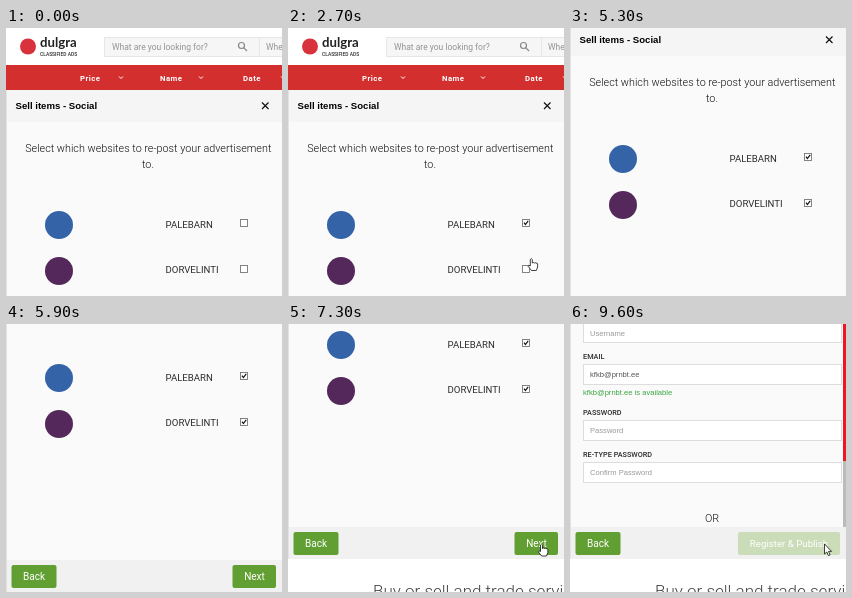
These frames come from a looping animation (276x268 px, 9.9 s). An HTML page:

```html
<!DOCTYPE html>
<html lang="en">
<head>
<meta charset="utf-8">
<title>Re-post an advertisement</title>
<style>
html, body { margin: 0; width: 100%; height: 100%; overflow: hidden; background: #fff; }
svg { display: block; width: 100vw; height: 100vh; }
text { font-family: Roboto, sans-serif; fill: #2b2b2b; white-space: pre; }
.brand { font: bold 13.2px Lato, sans-serif; fill: #222; }
.tag { font-size: 4.9px; font-weight: 500; }
.hint { font-size: 8.5px; fill: #949494; }
.nav { font-size: 7.8px; font-weight: 700; letter-spacing: .45px; fill: #fff; }
.title { font: bold 9.6px "Liberation Sans", Arial, sans-serif; fill: #000; }
.lead { font-size: 10.8px; font-weight: 300; fill: #111; text-anchor: middle; }
.site { font-size: 9.6px; }
.btn { font-size: 10px; fill: #fff; text-anchor: middle; }
.promo { font-size: 17px; font-weight: 300; fill: #444; }
.label { font-size: 7.3px; font-weight: 500; }
.field { font: 7.6px "Liberation Sans", Arial, sans-serif; fill: #999; }
.typed { fill: #555; }
.ok { fill: #3aa640; }
.search { fill: #f6f6f6; stroke: #e6e6e6; }
.box { fill: #fff; stroke: #ddd; }
.line { fill: none; stroke: #111; stroke-width: 1.2; }
.cursor { fill: #fff; stroke: #111; stroke-width: .8; stroke-linejoin: round; }
</style>
</head>
<body>
<svg viewBox="0 0 276 268">
  <defs>
    <rect id="checkbox" x=".5" y=".5" width="7" height="7" fill="#fff" stroke="#777" stroke-width=".9"/>
    <path id="tick" class="line" d="M2 3.7 3.4 5.5 6.2 1.8"/>
    <path id="chevron" d="M-2-1 0 1 2-1" fill="none" stroke="#fff"/>
    <g id="back">
      <rect x="5.5" width="45" height="23" rx="2" fill="#629f33"/>
      <text class="btn" x="28" y="14.5">Back</text>
    </g>
  </defs>

  <g id="page">
    <rect width="276" height="38" fill="#fff"/>
    <circle cx="22" cy="18.5" r="8" fill="#d8323c"/>
    <text class="brand" x="34" y="19">dulgra</text>
    <text class="tag" x="34" y="27.5">CLASSIFIED ADS</text>
    <rect class="search" x="98.5" y="9.5" width="155" height="19"/>
    <rect class="search" x="253.5" y="9.5" width="40" height="19"/>
    <text class="hint" x="106" y="22">What are you looking for?</text>
    <text class="hint" x="260" y="22">Where</text>
    <g fill="none" stroke="#888" stroke-width="1.2"><circle cx="235.5" cy="17.5" r="3"/><path d="M237.7 19.7 241 23"/></g>

    <rect y="37" width="276" height="25" fill="#d32f2f"/>
    <text class="nav" x="74" y="53">Price</text>
    <text class="nav" x="154" y="53">Name</text>
    <text class="nav" x="237" y="53">Date</text>
    <use href="#chevron" x="115" y="49.5"/>
    <use href="#chevron" x="195" y="49.5"/>
    <use href="#chevron" x="277" y="49.5"/>

    <rect y="62" width="276" height="32" fill="#f6f5f6"/>
    <text class="title" x="9.5" y="81.2">Sell items - Social</text>
    <path class="line" d="M256 74.5l6.5 6.5m0-6.5l-6.5 6.5"/>

    <rect y="94" width="276" height="285" fill="#fafafa"/>
    <text class="lead" x="142.3" y="124">Select which websites to re-post your advertisement</text>
    <text class="lead" x="142" y="140">to.</text>
    <circle cx="53" cy="197" r="14" fill="#3463a8"/>
    <circle cx="53" cy="243" r="14" fill="#55285c"/>
    <text class="site" x="159.5" y="200">PALEBARN</text>
    <text class="site" x="159.5" y="245.3">DORVELINTI</text>
    <use href="#checkbox" x="234" y="191"/>
    <use href="#checkbox" x="234" y="237"/>
    <use id="tick1" href="#tick" x="234" y="191"/>
    <use id="tick2" href="#tick" x="234" y="237"/>

    <rect y="379" width="276" height="32" fill="#f1f1f1"/>
    <use href="#back" y="384"/>
    <rect x="226.5" y="384" width="43.5" height="23" rx="2" fill="#629f33"/>
    <text class="btn" x="248.5" y="398.5">Next</text>
    <path d="M.5 62V411" stroke="#e2e2e2"/>
    <text class="promo" x="85" y="449">Buy or sell and trade services</text>
  </g>

  <path id="hand" class="cursor" d="M3 8V1.5q1-1.8 2 0V5q1-1 2 0 1-.8 1.7.2 1.3-.6 1.6.6V9L9 12.5H4.2L.7 8.2q.2-1.6 2.3-.2z"/>

  <g id="form">
    <rect width="276" height="203" fill="#fafafa"/>
    <rect y="203" width="276" height="32" fill="#f1f1f1"/>
    <path d="M.5 0V235" stroke="#e2e2e2"/>
    <rect class="box" x="13.5" y="-2.5" width="258" height="21"/>
    <rect class="box" x="13.5" y="40.5" width="258" height="20"/>
    <rect class="box" x="13.5" y="96.5" width="258" height="20"/>
    <rect class="box" x="13.5" y="138.5" width="258" height="20"/>
    <text class="field" x="20" y="11.5">Username</text>
    <text class="label" x="13" y="35">EMAIL</text>
    <text class="field typed" x="20" y="53">kfkb@prnbt.ee</text>
    <text class="field ok" x="13" y="71">kfkb@prnbt.ee is available</text>
    <text class="label" x="13" y="90.5">PASSWORD</text>
    <text class="field" x="20" y="109">Password</text>
    <text class="label" x="13" y="132.5">RE-TYPE PASSWORD</text>
    <text class="field" x="20" y="151">Confirm Password</text>
    <text class="lead" x="142" y="198">OR</text>
    <rect x="273" width="3" height="137" fill="#ee1620"/>
    <rect x="273" y="137" width="3" height="66" fill="#bbb"/>
    <use href="#back" y="208"/>
    <rect x="168" y="208" width="102" height="23" rx="2" fill="#cbdcb9"/>
    <text class="btn" x="219" y="222.5" style="font-size:9.7px">Register &amp; Publish</text>
  </g>

  <path id="arrow" class="cursor" d="M0 0V10l2.3-2 1.6 3.6 1.7-.7L4 7.4h3.1z"/>
</svg>
<script>
const LOOP = 9900, STEP = 100;
const $ = id => document.getElementById(id);

// Keys are [time, value, value...]; values are held before the first and after the last.
function along(keys, t) {
  const i = keys.findIndex(k => k[0] >= t);
  if (i < 0) return keys.at(-1).slice(1);
  if (i === 0) return keys[0].slice(1);
  const a = keys[i - 1], b = keys[i];
  const u = (t - a[0]) / (b[0] - a[0]);
  return a.slice(1).map((v, j) => v + (b[j + 1] - v) * u);
}

const scroll = [[4900, 0], [5000, 14], [5300, 66], [5900, 143], [6300, 175], [6500, 175], [6600, 176]];
const pointer = [
  [100, 266, 176], [700, 235, 194], [2200, 235, 194], [2700, 239.3, 230], [3100, 236, 236],
  [3400, 236, 236], [3700, 277, 236], [6800, 277, 236], [6900, 257, 196], [7300, 249.5, 219.5],
  [9500, 249.5, 219.5], [9600, 254.5, 220]
];

const within = (t, a, b) => t >= a && t < b;
const show = (id, on) => $(id).setAttribute("visibility", on ? "visible" : "hidden");
const move = (id, x, y) => $(id).setAttribute("transform", `translate(${x} ${y})`);

function draw(t) {
  move("page", 0, -Math.round(along(scroll, t)[0]));
  show("tick1", t >= 2100);
  show("tick2", t >= 3300);

  const [x, y] = along(pointer, t);
  const visible = within(t, 100, 3700) || t >= 6900;
  const isArrow = t < 600 || within(t, 2400, 2700) || within(t, 3500, 3700) ||
    within(t, 6900, 7100) || t >= 9600;
  move("hand", x, y);
  move("arrow", x, y);
  show("hand", visible && !isArrow);
  show("arrow", visible && isArrow);

  $("form").setAttribute("opacity", Math.min(1, Math.max(0, (t - 8500) / 800)));
}

const start = performance.now();
function frame() {
  const t = (performance.now() - start) % LOOP;
  draw(Math.floor(t / STEP) * STEP);
  requestAnimationFrame(frame);
}
frame();
</script>
</body>
</html>
```
